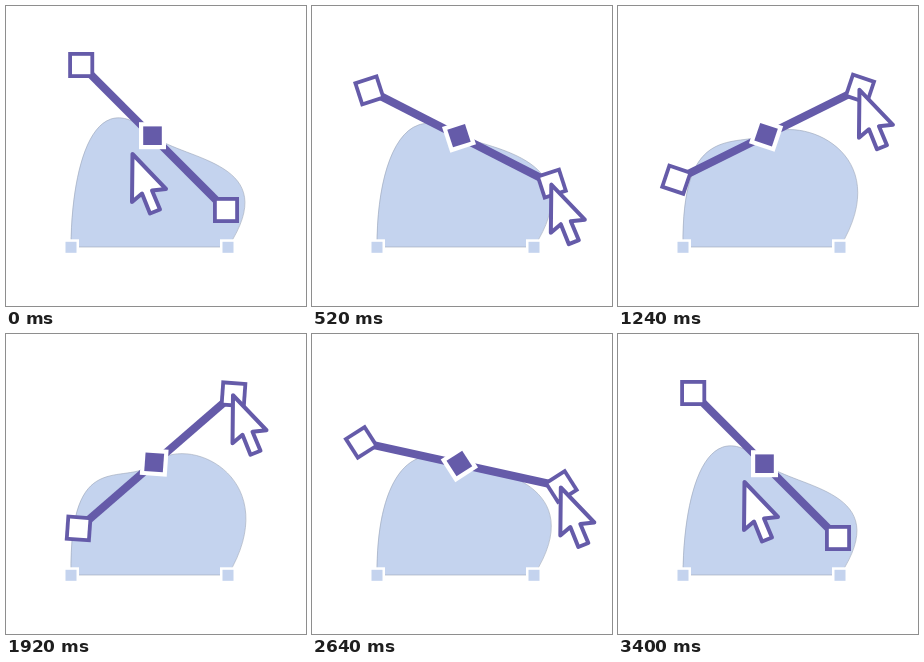
Animation of 300 by 300 pixels, one loop 4.35 s. Source, as an HTML page with a canvas:

```html
<!DOCTYPE html>
<html lang="en">
<head>
<meta charset="utf-8">
<title>Curve handle</title>
<style>
  html, body { margin: 0; width: 100%; height: 100%; overflow: hidden; background: #fff; }
  canvas { display: block; width: 300px; height: 300px; }
</style>
</head>
<body>
<canvas id="stage"></canvas>
<script>
const LOOP = 4350, STEP = 40;
const BLUE = '#c4d3ee', EDGE = '#9aa5b8', PURPLE = '#655ba9', WHITE = '#fff';
const SWING = -89.2 * Math.PI / 180;

// The blob: three fixed nodes, with control points for either end of the swing
const START = [65, 241], TOP = [147, 130], END = [222, 241];
const DOWN = [[65, 172], [84, 70], [180, 155], [278, 156]];
const UP = [[63, 108], [118, 157], [182, 95], [280, 144]];

const PIVOT = [146.6, 128.1];
const LEFT = [75.2, 59], MID = [146.5, 129.7], RIGHT = [220, 204];
const REST = [124, 145];

const canvas = document.getElementById('stage');
const ctx = canvas.getContext('2d');
const ratio = window.devicePixelRatio || 1;
canvas.width = canvas.height = 300 * ratio;

const span = (t, a, b) => Math.min(1, Math.max(0, (t - a) / (b - a)));
const mix = (a, b, k) => [a[0] + (b[0] - a[0]) * k, a[1] + (b[1] - a[1]) * k];

function turn([x, y], angle) {
  const c = Math.cos(angle), s = Math.sin(angle);
  const dx = x - PIVOT[0], dy = y - PIVOT[1];
  return [PIVOT[0] + dx * c - dy * s, PIVOT[1] + dx * s + dy * c];
}

function square([x, y], angle, size, fill, border, width) {
  const inner = size - width * 2;
  ctx.save();
  ctx.translate(x, y);
  ctx.rotate(angle);
  ctx.fillStyle = border;
  ctx.fillRect(-size / 2, -size / 2, size, size);
  ctx.fillStyle = fill;
  ctx.fillRect(-inner / 2, -inner / 2, inner, inner);
  ctx.restore();
}

function blob(k) {
  const [a, b, c, d] = DOWN.map((p, i) => mix(p, UP[i], k));
  ctx.beginPath();
  ctx.moveTo(...START);
  ctx.bezierCurveTo(...a, ...b, ...TOP);
  ctx.bezierCurveTo(...c, ...d, ...END);
  ctx.closePath();
  ctx.fillStyle = BLUE;
  ctx.fill();
  ctx.strokeStyle = EDGE;
  ctx.lineWidth = 0.6;
  ctx.stroke();
}

function cursor([x, y]) {
  const arrow = new Path2D('M2.5 3 L2 51 L12 42.5 L20 62.5 L30 58.5 L22 39.5 L36 38 Z');
  ctx.save();
  ctx.translate(x, y);
  ctx.lineJoin = 'round';
  ctx.fillStyle = WHITE;
  ctx.fill(arrow);
  ctx.strokeStyle = PURPLE;
  ctx.lineWidth = 4;
  ctx.stroke(arrow);
  ctx.restore();
}

function draw(t) {
  const swing = span(t, 278, 1480) - span(t, 1876, 3080);
  const grab = span(t, 0, 278) - span(t, 3080, 3400);
  const angle = SWING * swing;
  const [left, mid, right] = [LEFT, MID, RIGHT].map(p => turn(p, angle));

  ctx.setTransform(ratio, 0, 0, ratio, 0, 0);
  ctx.fillStyle = WHITE;
  ctx.fillRect(0, 0, 300, 300);

  blob(swing);
  for (const x of [START[0], END[0]]) square([x, 241.3], 0, 16, BLUE, WHITE, 2.5);

  ctx.beginPath();
  ctx.moveTo(...left);
  ctx.lineTo(...right);
  ctx.strokeStyle = PURPLE;
  ctx.lineWidth = 8;
  ctx.stroke();

  for (const end of [left, right]) square(end, angle, 26, WHITE, PURPLE, 3.8);
  square(mid, angle, 27, PURPLE, WHITE, 4.2);

  cursor(mix(REST, [right[0] - 3, right[1] - 2], grab));
}

const start = performance.now();
function tick() {
  const t = (performance.now() - start) % LOOP;
  draw(Math.floor(t / STEP) * STEP);
  requestAnimationFrame(tick);
}
tick();
</script>
</body>
</html>
```
